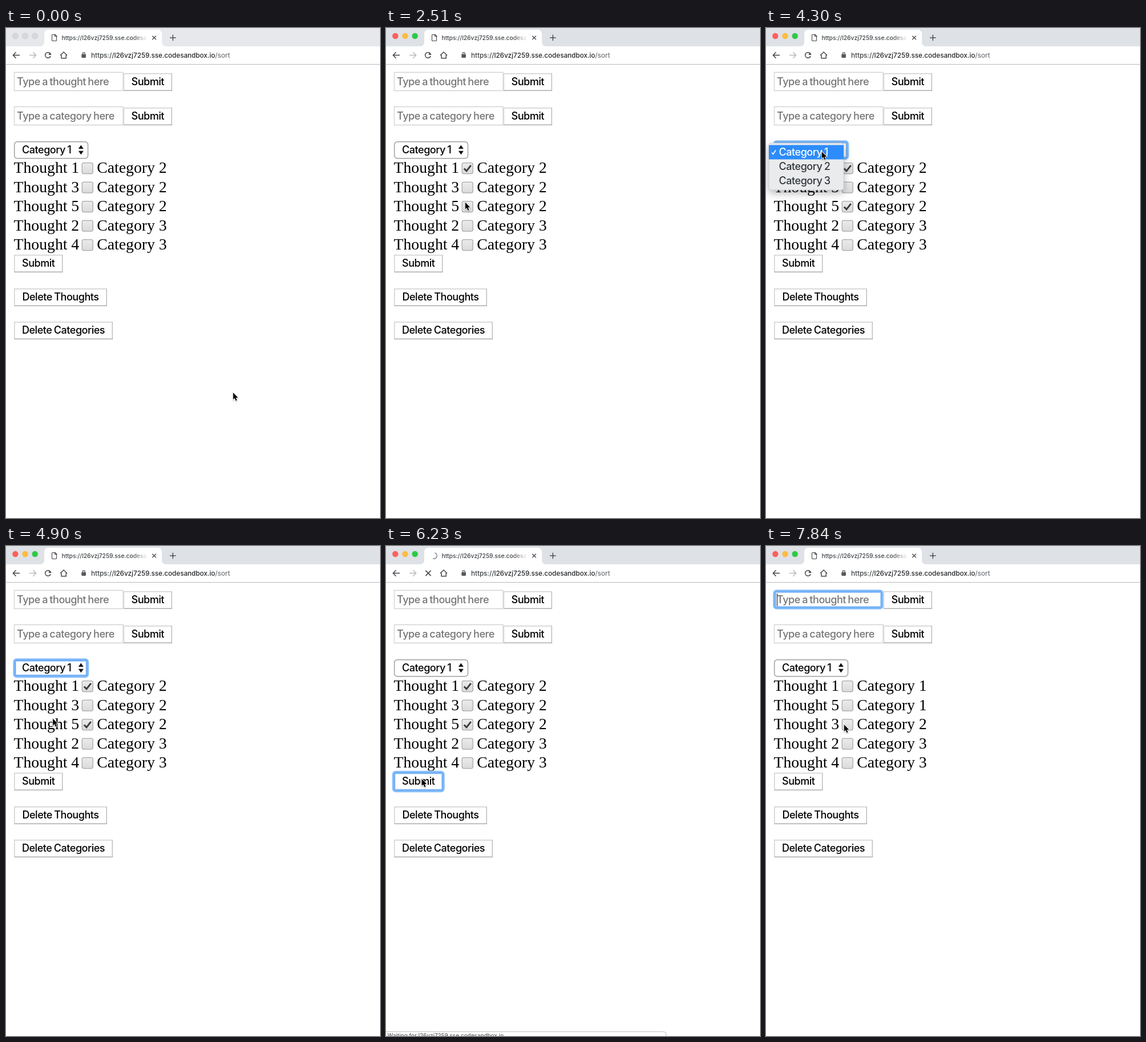
Animation, 655 px wide and 856 px high, one loop 7990 ms. Source, as an HTML page with a canvas:

```html
<!DOCTYPE html>
<html lang="en">
<head>
<meta charset="utf-8">
<title>Sort thoughts</title>
<style>
html, body { margin: 0; width: 100%; height: 100%; overflow: hidden; background: #fff; }
canvas { display: block; }
</style>
</head>
<body>
<canvas id="stage" width="655" height="856"></canvas>
<script>
const c = document.getElementById('stage').getContext('2d');
const LOOP = 7990;
const STEP = LOOP / 54;
const SANS = 'Inter, Roboto, sans-serif';
const SERIF = '"Liberation Serif", "Times New Roman", serif';
const INK = '#45484c';
const HOST = 'l26vzj7259.sse.codesandbox.io';

const AT = {
  activate: 730, blur: 1610, checkFirst: 1760, checkThird: 2810,
  menuOpen: 4300, menuFade: 4750, menuGone: 4900, selectBlur: 5340,
  submit: 5490, load: 5790, commit: 6540, loaded: 7110
};

const MOVES = [
  { from: 0, to: 450, x: 364, y: 607 },
  { from: 730, to: 1160, x: 121, y: 258 },
  { from: 1200, to: 1760, x: 138, y: 238 },
  { from: 1910, to: 2810, x: 138, y: 306 },
  { from: 2960, to: 3560, x: 97, y: 215 },
  { from: 4750, to: 5490, x: 62, y: 406 },
  { from: 6960, to: 7840, x: 136, y: 311 }
];

const clamp = k => Math.max(0, Math.min(1, k));
const easeOut = k => 1 - (1 - k) ** 3;

function pointerAt(t) {
  let x = 397, y = 636;
  for (const m of MOVES) {
    const k = easeOut(clamp((t - m.from) / (m.to - m.from)));
    x += (m.x - x) * k;
    y += (m.y - y) * k;
  }
  return [x, y];
}

// y is the middle of the capital letters
function text(s, x, y, size, color, family = SANS) {
  c.font = `${family === SANS ? 500 : 400} ${size}px ${family}`;
  c.fillStyle = color;
  c.fillText(s, x, y + size * 0.36);
}

// Form text is set tighter than the browser bars
function label(s, x, y, color = '#000', align = 'left') {
  c.save();
  c.letterSpacing = '-0.45px';
  c.wordSpacing = '-1px';
  c.textAlign = align;
  text(s, x, y, 18, color);
  c.restore();
}

function box(x, y, w, h, r, fill, stroke, width = 1) {
  c.beginPath();
  c.roundRect(x, y, w, h, r);
  if (fill) { c.fillStyle = fill; c.fill(); }
  if (stroke) { c.strokeStyle = stroke; c.lineWidth = width; c.stroke(); }
}

function line(color, width, ...p) {
  c.beginPath();
  for (let i = 0; i < p.length; i += 2) c.lineTo(p[i], p[i + 1]);
  c.strokeStyle = color;
  c.lineWidth = width;
  c.stroke();
}

function triangle(x, y, w, h, color) {
  c.beginPath();
  c.moveTo(x - w, y);
  c.lineTo(x, y + h);
  c.lineTo(x + w, y);
  c.fillStyle = color;
  c.fill();
}

function arc(x, y, r, from, to, color, width) {
  c.beginPath();
  c.arc(x, y, r, from, to);
  c.strokeStyle = color;
  c.lineWidth = width;
  c.stroke();
}

function cross(x, y, r, color, width) {
  line(color, width, x - r, y - r, x + r, y + r);
  line(color, width, x - r, y + r, x + r, y - r);
}

function ring(x, y, w, h) {
  box(x, y, w, h, 4, null, '#b5d8fc', 6);
  box(x, y, w, h, 3, null, '#7ab7fa', 4);
  box(x + 1.5, y + 1.5, w - 3, h - 3, 1, null, '#66a5ec', 1);
}

function spinner(t) {
  const blue = t >= AT.commit;
  const turn = (t - 6820) / STEP * (blue ? 0.9 : -0.7);
  arc(84, 17, 5.2, turn + 2.1, turn + 5.4, blue ? '#4286f4' : '#8b9098', 1.6);
}

function documentIcon() {
  box(80.5, 11.5, 8, 11, 1, null, INK, 1.1);
  box(85.5, 10.5, 4, 4, 0, '#fff');
  line(INK, 1.1, 85.5, 11, 85.5, 14.5, 89, 14.5, 85.5, 11);
}

function tabStrip(t, active, loading) {
  c.fillStyle = active ? '#dee1e6' : '#e7e8ec';
  c.fillRect(0, 0, 655, 32);
  ['#fc605b', '#fdbc40', '#2ec946'].forEach((color, i) => {
    const x = 16.3 + i * 17.2;
    box(x - 5.2, 8.8, 10.4, 10.4, 5.2, active ? color : '#d6d8db');
    if (!active) arc(x, 14, 4.9, 0, 7, '#c6c8cc', 0.8);
  });

  c.beginPath();
  c.moveTo(60, 32);
  c.arcTo(67, 32, 67, 25, 7);
  c.arcTo(67, 3, 74, 3, 7);
  c.arcTo(273, 3, 273, 10, 7);
  c.arcTo(273, 32, 280, 32, 7);
  c.lineTo(280, 32);
  c.fillStyle = '#fff';
  c.fill();

  if (loading) spinner(t);
  else documentIcon();

  const fade = c.createLinearGradient(222, 0, 248, 0);
  fade.addColorStop(0, '#3c4043');
  fade.addColorStop(1, 'rgba(60,64,67,0)');
  text('https://' + HOST.slice(0, 21), 97.5, 17, 10.25, fade);
  cross(259.5, 17, 3.3, INK, 1.3);
  line(INK, 1.4, 287, 17, 297.5, 17);
  line(INK, 1.4, 292.3, 11.8, 292.3, 22.2);
}

function arrow(x, dir, color) {
  line(color, 1.6, x - dir * 5.5, 47.5, x + dir * 5.5, 47.5);
  line(color, 1.6, x + dir, 42.3, x + dir * 6, 47.5, x + dir, 52.7);
}

function toolbar(loading) {
  arrow(18.5, -1, INK);
  arrow(46.5, 1, '#b9bbbe');
  if (loading) {
    cross(74, 47.5, 4.6, INK, 1.6);
  } else {
    arc(73.5, 47.5, 4.8, 0.35, 5.5, INK, 1.6);
    triangle(77, 47, 2.7, -4.5, INK);
  }
  line(INK, 1.5, 95, 47.8, 101, 42, 107, 47.8);
  line(INK, 1.5, 97, 47, 97, 52.7, 105.2, 52.7, 105.2, 47);

  box(132.3, 45.5, 7.6, 6.4, 1, '#54575b');
  arc(136.1, 45, 2.2, Math.PI, 2 * Math.PI, '#54575b', 1.2);

  let x = 149;
  [['https://', '#3c4043'], [HOST, '#26282b'], ['/sort', '#72767b']].forEach(([s, color]) => {
    text(s, x, 47.5, 11.65, color);
    x += c.measureText(s).width;
  });
  c.fillStyle = '#b9babc';
  c.fillRect(0, 63, 655, 1);
}

function button(name, x, y, w, focused) {
  const h = 31;
  box(x, y, w, h, 0, '#fff');
  line('#d0d0d0', 1.5, x + 0.8, y + h, x + 0.8, y + 0.8, x + w, y + 0.8);
  line('#bdbdbd', 1.5, x + w - 0.8, y + 0.8, x + w - 0.8, y + h);
  line('#adadad', 1.5, x + 0.8, y + h - 0.8, x + w, y + h - 0.8);
  if (focused) ring(x - 0.5, y - 0.5, w + 1, h + 1);
  label(name, x + w / 2, y + 15, '#000', 'center');
}

function input(hint, y, focused) {
  if (focused) ring(15, y + 2, 188, 29);
  else box(14.5, y + 0.5, 190.5, 32, 0, '#fff', '#d4d4d4', 1.4);
  label(hint, 19, y + 17, '#757575');
  if (focused) {
    c.fillStyle = '#111';
    c.fillRect(19, y + 6, 1, 22);
  }
}

function select(focused) {
  if (focused) ring(15, 199, 127.5, 28.5);
  else box(14.7, 198.7, 128.8, 29, 5, '#fff', '#9f9f9f', 1.5);
  label('Category 1', 28, 213);
  triangle(131.3, 211, 4.5, -6.5, '#111');
  triangle(131.3, 214.8, 4.5, 6.5, '#111');
}

function checkbox(y, checked) {
  const g = c.createLinearGradient(0, y, 0, y + 20);
  g.addColorStop(0, '#ececec');
  g.addColorStop(1, '#dadada');
  box(133.2, y + 0.6, 19, 19, 3, g, '#a9a9a9', 1.3);
  if (checked) line('#3d3d3d', 3, 136.8, y + 10.5, 141, y + 14.8, 148.8, y + 4.8);
}

// Odd thoughts start in category 2, even ones in 3; submitting moves the picked ones to 1
function list(t) {
  const moved = t >= AT.commit;
  const picked = n => n === 1 && t >= AT.checkFirst || n === 5 && t >= AT.checkThird;
  const category = n => moved && picked(n) ? 1 : n % 2 ? 2 : 3;
  [1, 2, 3, 4, 5].sort((a, b) => category(a) - category(b)).forEach((n, i) => {
    const y = 245 + i * 33.5;
    text('Thought ' + n, 13.6, y - 1.6, 27.7, '#000', SERIF);
    text('Category ' + category(n), 159.3, y - 1.6, 27.7, '#000', SERIF);
    checkbox(y - 10, picked(n) && !moved);
  });
}

function menu(alpha) {
  c.save();
  c.globalAlpha = alpha;
  c.shadowColor = 'rgba(0,0,0,.3)';
  c.shadowBlur = 14;
  c.shadowOffsetY = 5;
  box(5, 201, 131, 82, 4, '#e9ebed');
  c.shadowColor = 'transparent';
  box(5, 201, 131, 82, 4, null, '#c9cbce', 0.7);
  c.fillStyle = '#2d8cfb';
  c.fillRect(5, 204.5, 131, 25);
  for (let i = 0; i < 3; i++) {
    label('Category ' + (i + 1), 22.5, 217 + i * 25, i ? '#33363a' : '#fff');
  }
  line('#fff', 1.6, 10, 217.5, 12.5, 220.5, 17, 213.5);
  c.restore();
}

function statusBar() {
  box(-5, 848.5, 495.5, 20, 4, '#fff', '#bdbfc2');
  text('Waiting for ' + HOST + '...', 2.5, 855.7, 9.9, '#5f6368');
}

function pointer(x, y) {
  c.save();
  c.translate(x + 0.8, y + 1);
  c.shadowColor = 'rgba(0,0,0,.3)';
  c.shadowBlur = 2;
  c.shadowOffsetY = 1;
  const arrowHead = new Path2D('M0 0V12L2.7 9.6L4.7 14.2L6.7 13.3L4.7 8.9L8.5 8.7Z');
  c.strokeStyle = '#fff';
  c.lineWidth = 1.8;
  c.stroke(arrowHead);
  c.shadowColor = 'transparent';
  c.fillStyle = '#000';
  c.fill(arrowHead);
  c.restore();
}

function draw(now) {
  const t = now % LOOP;
  const held = Math.floor(t / STEP + 0.2) * STEP;
  const within = (from, to) => t >= from && t < to;
  const loading = within(AT.load, AT.loaded);

  c.fillStyle = '#fff';
  c.fillRect(0, 0, 655, 856);
  tabStrip(held, t >= AT.activate, loading);
  toolbar(loading);

  input('Type a thought here', 77, within(AT.activate, AT.blur) || t >= AT.commit);
  input('Type a category here', 137, false);
  button('Submit', 205.5, 79, 85.5);
  button('Submit', 205.5, 139, 85.5);
  select(within(AT.menuOpen, AT.selectBlur));
  list(t);
  button('Submit', 14, 396, 85.5, within(AT.submit, AT.commit));
  button('Delete Thoughts', 14, 455, 163);
  button('Delete Categories', 14, 513, 173);

  if (within(AT.menuOpen, AT.menuGone)) menu(t < AT.menuFade ? 1 : 0.6);
  if (loading) statusBar();
  pointer(...pointerAt(held));
}

function loop() {
  draw(performance.now());
  requestAnimationFrame(loop);
}
loop();
</script>
</body>
</html>
```
